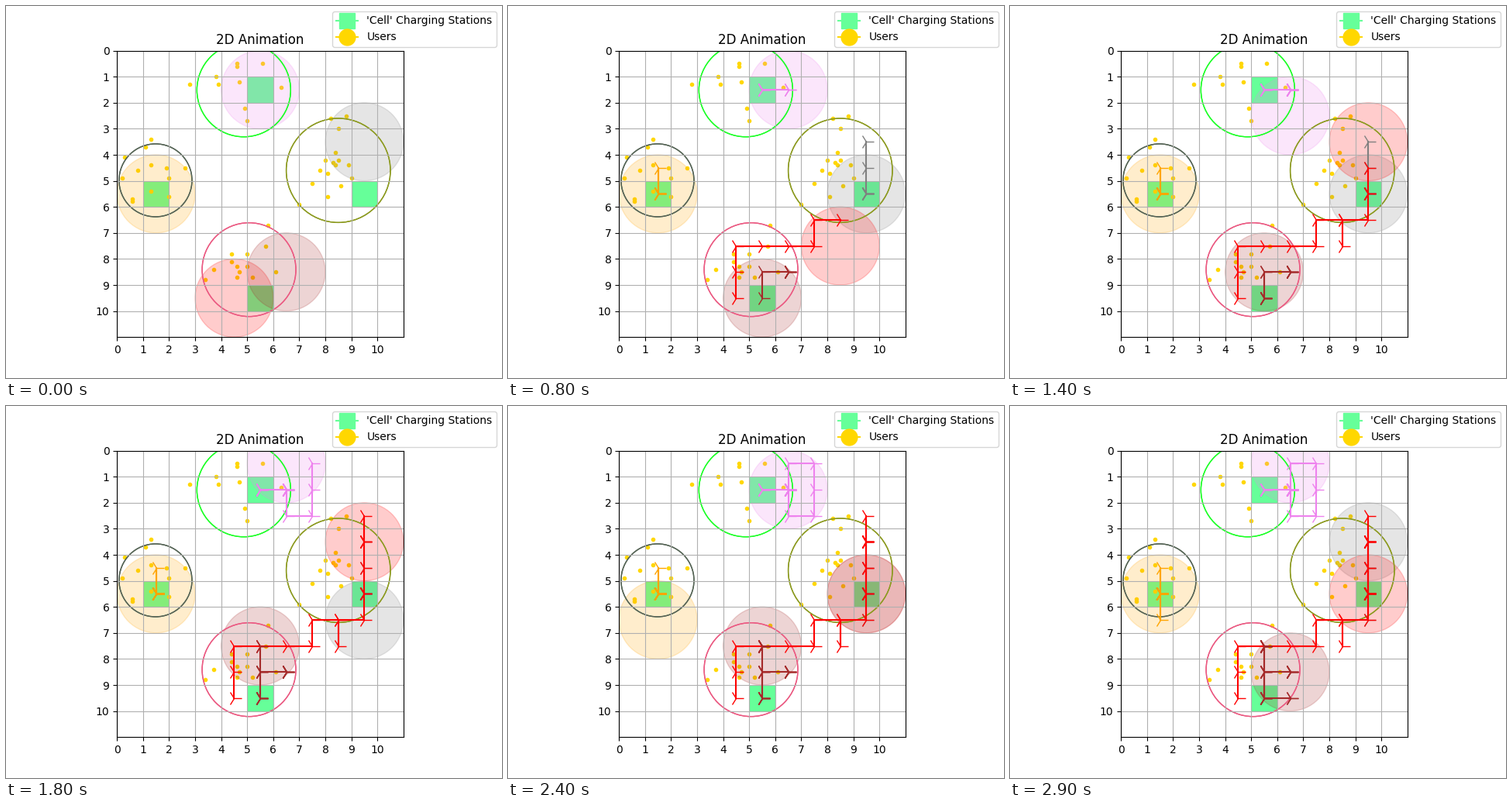
Write a matplotlib script that moves like this. It is 640 px wide and 480 px high and loops after 3 s.

```python
import matplotlib.pyplot as plt
from matplotlib.animation import FuncAnimation
from matplotlib.lines import Line2D
from matplotlib.patches import Circle, Rectangle

FRAMES, INTERVAL = 30, 100
STATION, USER = "#66ff99", "gold"
STEPS = {"U": (0, -1), "D": (0, 1), "L": (-1, 0), "R": (1, 0), ".": (0, 0)}

# User clusters: outline colour, centre, radius, member positions
CLUSTERS = [
    ("#1eff28", (4.87, 1.51), 1.8,
     [(2.8, 1.3), (3.8, 1.0), (3.9, 1.3), (4.6, 0.5), (4.6, 0.6),
      (5.6, 0.5), (4.7, 1.2), (6.3, 1.4), (4.9, 2.2), (5.0, 2.7)]),
    ("#8c9a20", (8.5, 4.6), 2.0,
     [(8.2, 2.6), (8.8, 2.5), (8.5, 3.0), (8.4, 3.9), (8.0, 4.2), (8.5, 4.2),
      (8.3, 4.3), (8.4, 4.4), (8.9, 4.4), (7.8, 4.6), (8.1, 4.7), (9.0, 4.9),
      (7.5, 5.1), (8.6, 5.2), (8.1, 5.6), (7.0, 5.9)]),
    ("#556455", (1.48, 4.98), 1.4,
     [(1.3, 3.4), (1.1, 3.7), (0.3, 4.1), (0.8, 4.6), (1.3, 4.4), (1.9, 4.5),
      (2.6, 4.5), (0.2, 4.9), (2.0, 4.9), (1.3, 5.4), (0.6, 5.7), (0.6, 5.8),
      (2.0, 5.6)]),
    ("#eb5a82", (5.07, 8.41), 1.8,
     [(5.8, 6.7), (5.7, 7.5), (4.4, 7.8), (5.0, 7.8), (4.4, 8.1), (4.6, 8.3),
      (5.0, 8.3), (3.7, 8.4), (4.7, 8.5), (6.1, 8.5), (4.6, 8.7), (5.2, 8.7),
      (3.4, 8.8)]),
]

# Walkers: colour, start cell centre, one move per frame (padded with rests)
WALKERS = [
    ("violet", (5.5, 1.5), "." * 5 + "R" + "." * 7 + "DRUULD" + "." * 9 + "U"),
    ("orange", (1.5, 5.5), "UD" + "." * 21 + "DU"),
    ("gray", (9.5, 3.5), "DD" + "." * 15 + "DU" + "." * 8 + "UU"),
    ("red", (4.5, 9.5), "UURRRURDURU.UUUD.....DD"),
    ("brown", (6.5, 8.5),
     "." * 5 + "LD" + "." * 5 + "U..U" + "." * 8 + "DDR.U"),
]


def walk(start, moves):
    path = [start]
    for move in moves.ljust(FRAMES - 1, "."):
        dx, dy = STEPS[move]
        x, y = path[-1]
        path.append((x + dx, y + dy))
    return path


fig, ax = plt.subplots(figsize=(6.4, 4.8), dpi=100)
ax.set_aspect("equal")
ax.set(xlim=(0, 11), ylim=(11, 0), xticks=range(11), yticks=range(11))
ax.set_title("2D Animation")
ax.grid(True)

for corner in [(5, 1), (9, 5), (1, 5), (5, 9)]:
    ax.add_patch(Rectangle(corner, 1, 1, color=STATION, lw=0, zorder=1))

for color, center, radius, members in CLUSTERS:
    ax.plot(*zip(*members), ".", color=USER, ms=6, zorder=1.1)
    # Stacked outlines give the firm edge
    for _ in range(2):
        ax.add_patch(Circle(center, radius, fill=False, ec=color, zorder=1.4))

walkers = []
for color, start, moves in WALKERS:
    disc = ax.add_patch(Circle(start, 1.5, color=color, alpha=0.2, zorder=1.2))
    trail, = ax.plot([], [], color=color, marker="4", ms=15)
    walkers.append((disc, trail, walk(start, moves)))

fig.legend(handles=[
    Line2D([], [], color=STATION, marker="s", ms=15,
           label="'Cell' Charging Stations"),
    Line2D([], [], color=USER, marker="o", ms=15, label="Users"),
], loc="upper right")


def update(frame):
    for disc, trail, path in walkers:
        disc.center = path[frame]
        past = path[:frame]
        trail.set_data([x for x, _ in past], [y for _, y in past])
    return [artist for disc, trail, _ in walkers for artist in (disc, trail)]


anim = FuncAnimation(fig, update, frames=FRAMES, interval=INTERVAL,
                     repeat=True, repeat_delay=0)
plt.show()
```
